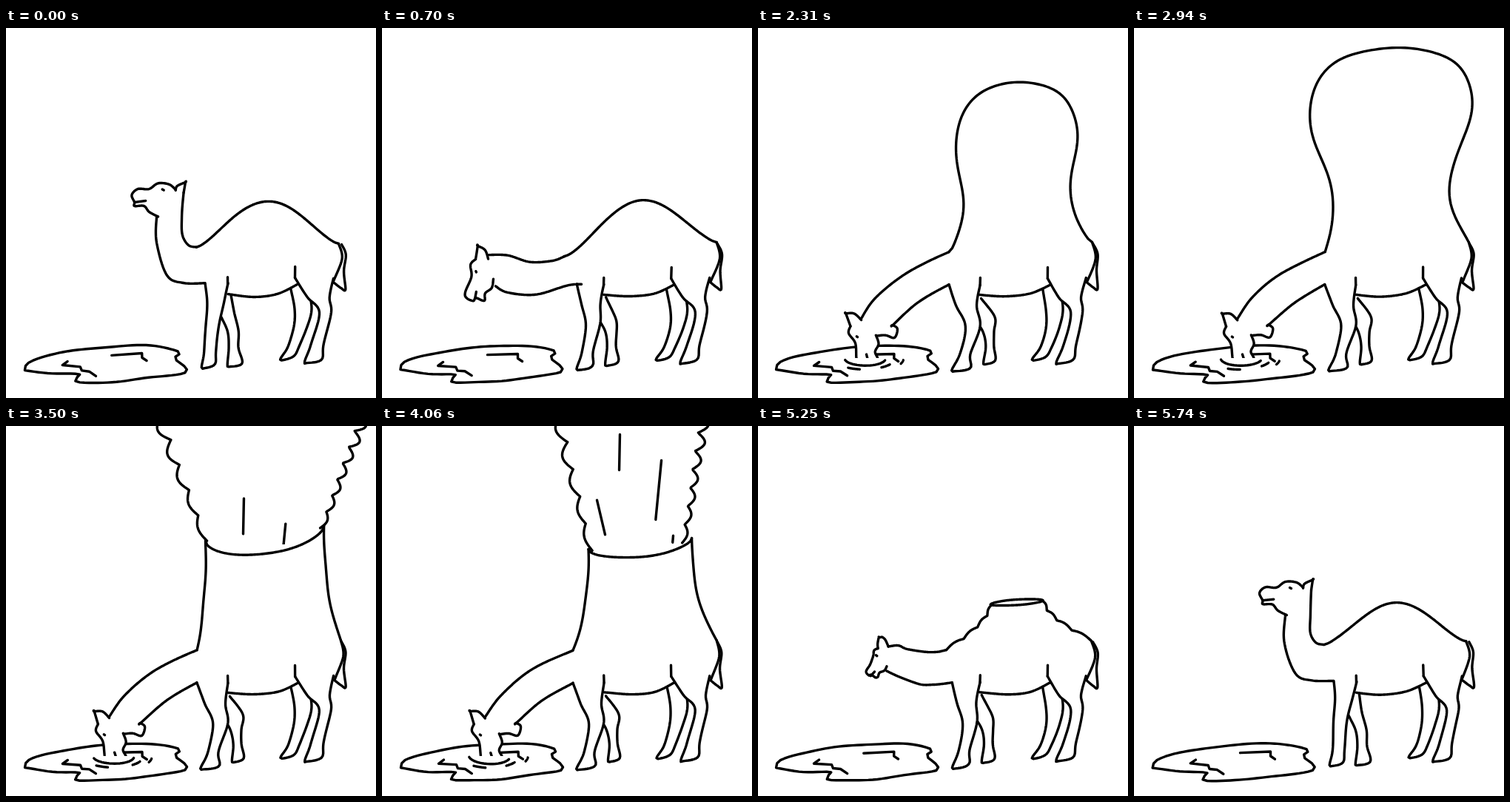
An HTML page with a canvas that plays this animation: 500 px wide and 500 px high, repeating every 5810 ms.

```html
<!DOCTYPE html>
<html lang="en">
<head>
<meta charset="utf-8">
<title>Thirsty camel</title>
<style>
html, body { margin: 0; width: 100%; height: 100%; overflow: hidden; background: #fff; }
canvas { display: block; width: 100vmin; height: 100vmin; }
</style>
</head>
<body>
<canvas id="stage" width="500" height="500"></canvas>
<script>
const ctx = document.getElementById('stage').getContext('2d');
const STEP = 70, FRAMES = 83, N = 80;
const BURST = 3150, DETACH = 4550, CLOSE = 5320;
const WATERLINE = 446;
const { PI, sin, cos, abs, sqrt, hypot } = Math;

const lerp = (a, b, u) => a + (b - a) * u;
const mix = (p, q, u) => p.map((a, i) => a.map((v, j) => lerp(v, q[i][j], u)));
const sample = (f, n = N) => Array.from({ length: n + 1 }, (_, i) => f(i / n));
const parse = s => s.split(' ').map(p => p.split(',').map(Number));

// Values at time t between rows of [time, ...values].
function ramp(t, rows) {
  let i = 0;
  while (i < rows.length - 2 && rows[i + 1][0] <= t) i++;
  const a = rows[i], b = rows[i + 1];
  const u = Math.min(1, Math.max(0, (t - a[0]) / (b[0] - a[0])));
  return a.slice(1).map((v, j) => lerp(v, b[j + 1], u));
}

// Smooth curve through the points; a repeated point makes a sharp corner.
function smooth(p) {
  const out = [p[0]];
  for (let i = 0; i < p.length - 1; i++) {
    const a = p[i - 1] || p[i], b = p[i], c = p[i + 1], d = p[i + 2] || c;
    for (let k = 1; k <= 10; k++) {
      const u = k / 10;
      out.push([0, 1].map(j => b[j] + u * ((c[j] - a[j]) / 2 +
        u * (a[j] - 2.5 * b[j] + 2 * c[j] - d[j] / 2 +
        u * (1.5 * (b[j] - c[j]) + (d[j] - a[j]) / 2)))));
    }
  }
  return out;
}

// Evenly spaced points, so that any two poses can be blended.
function even(p) {
  const len = [0];
  for (let i = 1; i < p.length; i++)
    len.push(len[i - 1] + hypot(p[i][0] - p[i - 1][0], p[i][1] - p[i - 1][1]));
  let i = 1;
  return sample(n => {
    const at = len[len.length - 1] * n;
    while (i < p.length - 1 && len[i] < at) i++;
    const u = (at - len[i - 1]) / (len[i] - len[i - 1] || 1);
    return [lerp(p[i - 1][0], p[i][0], u), lerp(p[i - 1][1], p[i][1], u)];
  });
}

const curve = s => even(smooth(parse(s)));

// Leg outline from joints of [x, y, width], hip to hoof.
function limb(joints) {
  const side = s => joints.map(([x, y, w]) => [x + s * w / 2, y]);
  const left = side(-1), right = side(1).reverse();
  const heel = left[left.length - 1];
  right[0][1] -= 3;
  return even(smooth([...left, [heel[0] + 3, heel[1] + 2], ...right]));
}

// Offsets a path by a row of round bumps.
function puffy(path, count, phase, amp, side) {
  return sample(u => {
    const [x, y] = path(u), [x0, y0] = path(u - 0.005), [x1, y1] = path(u + 0.005);
    const size = hypot(x1 - x0, y1 - y0) || 1;
    const bump = side * amp(u) * abs(sin(PI * (count * u - phase))) / size;
    return [x + (y1 - y0) * bump, y - (x1 - x0) * bump];
  }, 120);
}

let boil = 0;
function line(p, fill) {
  ctx.beginPath();
  for (const [x, y] of p)
    ctx.lineTo(x + 0.5 * sin(y * 0.07 + boil), y + 0.5 * sin(x * 0.06 + boil * 1.7));
  if (fill) ctx.fill();
  ctx.stroke();
}

// ---- Camel ----

const headUp = {
  face: curve('229,218 220,211 205,210 193,218 178,218 170,226 174,236 174,241 187,241 194,249 206,255'),
  ear: curve('229,219 231,213 242,208 242,208 240,222'),
  mouth: curve('174,236 189,234'),
  eye: curve('211,218 213,219')
};
const headLow = {
  face: curve('122,349 118,358 125,373 124,395 128,402 138,403 140,398 152,398 150,388 156,378 154,366'),
  ear: curve('122,349 119,331 119,331 130,333 138,343'),
  mouth: curve('139,398 138,390'),
  eye: curve('128,364 129,365')
};

// Turns the lowered head about the tip of its ear and shifts it.
function turned(angle, dx, dy) {
  const c = cos(angle), s = sin(angle), ox = 119, oy = 331;
  const move = ([x, y]) => [
    ox + dx + (x - ox) * c - (y - oy) * s,
    oy + dy + (x - ox) * s + (y - oy) * c
  ];
  return Object.fromEntries(Object.entries(headLow).map(([k, p]) => [k, p.map(move)]));
}

const standing = {
  front: limb([[285, 345, 31], [283, 370, 23], [279, 400, 18], [276, 438, 16], [273, 458, 18]]),
  farFront: limb([[294, 362, 20], [298, 385, 20], [307, 410, 15], [308, 432, 13], [309, 456, 20]]),
  rump: curve('449,291 454,312 442,344')
};
const braced = {
  front: limb([[279, 347, 42], [282, 375, 28], [290, 402, 20], [280, 440, 14], [275, 462, 25]]),
  farFront: limb([[294, 365, 16], [306, 390, 28], [311, 410, 15], [313, 430, 11], [313, 452, 16]]),
  rump: curve('452,290 456,312 445,342')
};
const halfway = {
  front: mix(standing.front, braced.front, 0.5),
  farFront: mix(standing.farFront, braced.farFront, 0.5),
  rump: braced.rump
};

const poses = {
  stand: {
    ...standing, ...headUp,
    nape: curve('240,222 238,255 238,279 246,293 257,296'),
    throat: curve('204,255 203,290 218,334 240,344 269,345')
  },
  reach: {
    ...halfway, ...turned(0.33, 10, -36),
    nape: curve('144,307 170,307 200,316 230,315 246,309'),
    throat: curve('154,349 170,357 210,360 252,348 270,346')
  },
  drink: {
    ...braced, ...turned(-0.15, 0, 55),
    nape: curve('139,394 160,364 200,331 258,303'),
    throat: curve('161,416 172,415 184,418 188,406 182,401 182,401 215,372 258,347')
  },
  lift: {
    ...braced, ...headLow,
    nape: curve('138,343 160,331 180,331 220,320 253,306'),
    throat: curve('155,376 180,368 210,360 258,347')
  }
};
const plan = [[0, 'stand'], [700, 'reach'], [1190, 'drink'], [4340, 'drink'],
  [4760, 'lift'], [5040, 'lift'], [5600, 'stand'], [5810, 'stand']];

function poseAt(t) {
  const i = plan.findIndex((p, n) => n && t < p[0]);
  const [t0, a] = plan[i - 1], [t1, b] = plan[i];
  const u = (t - t0) / (t1 - t0);
  return Object.fromEntries(Object.keys(poses[a]).map(k => [k, mix(poses[a][k], poses[b][k], u)]));
}

const hind = limb([[417, 338, 52], [422, 364, 30], [431, 384, 16], [421, 428, 17], [415, 451, 23]]);
const farHind = limb([[397, 353, 24], [401, 380, 23], [398, 404, 18], [389, 431, 15], [380, 447, 18]]);
const belly = curve('300,360 335,363 368,359 396,346');
const tail = curve('453,292 459,306 457,328 459,353 453,351 444,344');
const creases = [[[391, 323], [391, 338]], [[300, 337], [300, 347]]];

// A dome that swells into a balloon; v runs from the back (0) to the top (1).
function hump(t, front, back) {
  const [top, swell] = ramp(t, [[0, 234, 0], [700, 233, 0], [1260, 226, 0], [1680, 169, 0],
    [1890, 127, 0.15], [2520, 47, 0.85], [2940, 27, 1], [3150, 0, 1.25], [CLOSE, 241, 0], [5600, 239, 0]]);
  const power = 1.4 + 0.6 * Math.min(1, Math.max(0, (234 - top) / 65));
  const mid = 354;
  return sample(u => {
    const v = Math.min(1, sin(PI * u)), base = u < 0.5 ? front : back;
    const dome = Math.acos(v ** (1 / power)) * 2 / PI;
    const balloon = (0.97 + 0.16 * cos(7 * (v - 0.7))) * sqrt(1 - v ** 18);
    const x = mid - 10 * swell * sin(PI * v) + lerp(dome, balloon, swell) * (base[0] - mid);
    return [x, lerp(base[1], top, v)];
  }, 140);
}

// The burst hump: two walls that crumple into folds under an open rim.
function vessel(t, front, back) {
  const [lx, ly, rx, ry, near, far, fold, bend] = ramp(t, [
    [BURST, 238, 120, 450, 100, 45, 45, 0, 2.5],
    [3500, 270, 155, 430, 135, 28, 28, 0, 2.5],
    [4060, 279, 166, 419, 152, 18, 18, 0, 2.5],
    [4760, 275, 214, 423, 200, 6, -9, 1, 4],
    [5040, 277, 226, 421, 213, 7, -8, 1, 4],
    [CLOSE, 328, 247, 372, 243, 2, -3, 0, 1]
  ]);
  const wall = (base, x, y, side) => line(puffy(u => [
    x + (base[0] - x) * Math.max(0, 1 - u) ** bend, lerp(base[1], y, u)
  ], 4, 0, () => 12 * fold, side));
  wall(front, lx, ly, 1);
  wall(back, rx, ry, -1);
  const out = 6 * fold;
  const edge = sag => sample(u => [lerp(lx - out, rx + out / 3, u), lerp(ly, ry, u) + sag * abs(sin(PI * u)) ** 0.5]);
  line([...edge(near), ...edge(far).reverse()]);
  if (t >= DETACH && t < 5110) wrinkles((t - 4760) * 0.04);
}

function wrinkles(dy) {
  for (const [x, y, w, lift] of [[300, 234, 30, 5], [366, 229, 33, 5], [377, 240, 11, 3],
    [307, 263, 63, 1], [289, 286, 24, -1], [342, 295, 68, 8]])
    line(sample(u => [x + w * u, y + dy - lift * u + w / 16 * sin(PI * u)], 12));
}

// ---- Water ----

const puddle = curve('25,462 30,452 60,442 115,433 190,429 234,437 228,446 241,457 240,466 190,473 150,478 99,479 94,474 98,468 60,467 25,462');
const ripples = ['83,451 76,456 100,458 102,463 112,464 121,470', '143,442 184,440 184,446 190,450'].map(parse);

function rings() {
  for (const [r, from, to] of [[28, 0.3, 2.9], [40, 0.5, 0.9], [42, 1.7, 2.1], [52, 0.1, 0.35]])
    line(sample(u => {
      const a = lerp(from, to, u) + 0.08 * sin(boil * r);
      return [145 + r * cos(a), WATERLINE + 0.38 * r * sin(a)];
    }, 20));
}

function streaks(t) {
  ctx.save();
  ctx.beginPath();
  ctx.rect(0, 0, 500, 160);
  ctx.clip();
  for (const [x, y, dx, len] of [[321, 12, 0, 48], [378, 46, -8, 80], [290, 100, 12, 47], [394, 148, -1, 9]]) {
    const top = ((y + 80 - (t - 4060) * 0.6) % 250 + 250) % 250 - 80;
    line([[x, top], [x + dx, top + len]]);
  }
  ctx.restore();
}

function jet(t) {
  const [lx, ly, lx2, rx, ry, rx2] = ramp(t, [[BURST, 238, 120, 165, 448, 105, 498],
    [3500, 272, 155, 210, 425, 138, 478], [4060, 284, 168, 242, 406, 158, 430], [DETACH, 283, 182, 240, 412, 176, 430]]);
  const phase = (t - 4060) / 140, amp = u => 5 + 8 * u;
  line(puffy(u => [lerp(lx, lx2, u), lerp(ly, -15, u)], 5, phase, amp, 1));
  line(puffy(u => [lerp(rx, rx2, u), lerp(ry, -15, u)], 7, phase, amp, -1));
  streaks(t);
}

function cloud(dy) {
  const arc = (x, y, rx, ry, from, to) => u => {
    const a = lerp(from, to, u);
    return [x + rx * cos(a), y + dy + ry * sin(a)];
  };
  const puff = () => 6;
  line(puffy(arc(285, 3, 44, 39, PI, 0.35), 5, 0, puff, -1));
  line(puffy(arc(376, 5, 49, 46, 2.85, 0), 5, 0, puff, -1));
  line(puffy(u => [241, dy + 3 - 140 * u], 5, 0, puff, 1));
  line(puffy(u => [425, dy + 5 - 140 * u], 5, 0, puff, -1));
  if (dy < 80) {
    line(puffy(arc(314, 125, 11, 20, 0, 2 * PI), 5, 0, () => 5, 1));
    line(puffy(arc(388, 88, 7, 13, 0, 2 * PI), 4, 0, () => 4, 1));
  }
}

function draw(t) {
  boil = t / STEP * 2.4;
  ctx.fillStyle = '#fff';
  ctx.fillRect(0, 0, 500, 500);
  ctx.strokeStyle = '#000';
  ctx.lineWidth = 3.4;
  ctx.lineCap = ctx.lineJoin = 'round';

  const pose = poseAt(t);
  const front = pose.nape[N], back = pose.rump[0];
  [puddle, ...ripples, pose.farFront, farHind, belly].forEach(p => line(p));
  line(pose.front, true);
  line(hind, true);
  [...creases, tail, pose.rump, pose.nape, pose.throat].forEach(p => line(p));

  if (t < BURST || t >= CLOSE) line(hump(t, front, back));
  else {
    if (t < DETACH) jet(t);
    else if (t < 5040) cloud((4760 - t) * 0.55);
    vessel(t, front, back);
  }

  ctx.save();
  ctx.beginPath();
  ctx.rect(0, 0, 500, WATERLINE);
  ctx.clip();
  line(pose.face, true);
  [pose.ear, pose.mouth, pose.eye].forEach(p => line(p));
  ctx.restore();
  if (t >= 1190 && t < 4410) rings();
}

function tick(now) {
  draw(Math.floor(now / STEP) % FRAMES * STEP);
  requestAnimationFrame(tick);
}
draw(0);
requestAnimationFrame(tick);
</script>
</body>
</html>
```
